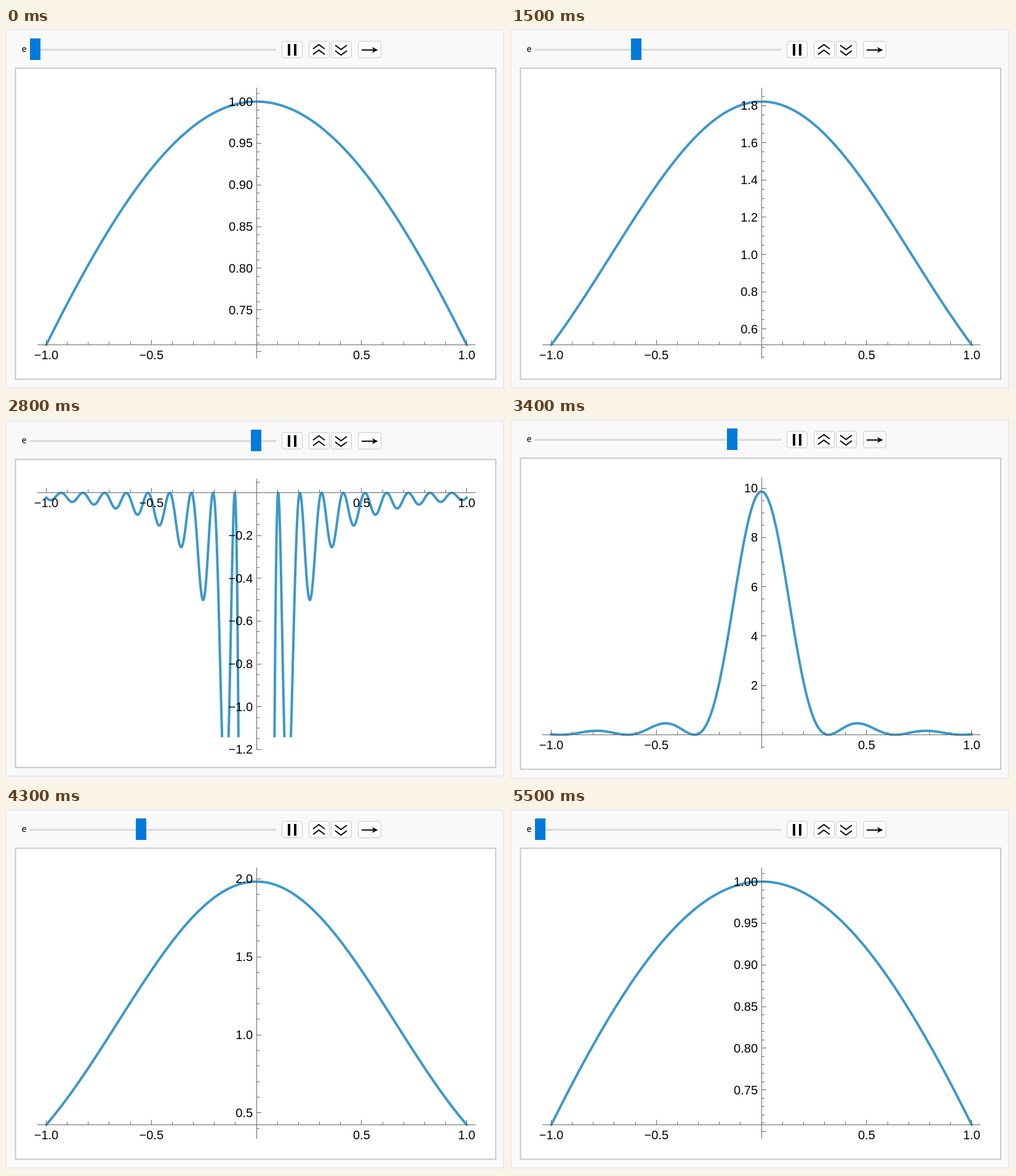
These frames come from a looping animation (811 by 589 pixels, 6000 ms). An HTML page with a canvas:

```html
<!DOCTYPE html>
<html lang="en">
<head>
<meta charset="utf-8">
<title>Interactive plot</title>
<style>
  html, body { margin: 0; width: 100%; height: 100%; overflow: hidden; background: #f3f3f3; }
  canvas { display: block; }
</style>
</head>
<body>
<canvas id="stage" width="811" height="589"></canvas>
<script>
const ctx = document.getElementById('stage').getContext('2d');
const LEFT = 51, RIGHT = 763, TOP = 97, BOTTOM = 538;
const DATA_TOP = 119.7, DATA_BOTTOM = 515.4;
const SAMPLES = 2400;
const toX = x => 407.1 + 341.6 * x;
const crisp = v => Math.floor(v) + 0.5;

// Parameter e: runs up in equal steps, turns, runs back, rests at zero.
function parameterAt(time) {
  const step = time < 500 ? 0 : Math.floor((time - 400) / 100);
  if (step === 0 || step > 50) return 0;
  return 0.0035 + 0.044755 * Math.min(step - 1, 50 - step);
}

function polyline(points, color, width) {
  ctx.beginPath();
  points.forEach(([x, y]) => ctx.lineTo(x, y));
  ctx.strokeStyle = color;
  ctx.lineWidth = width;
  ctx.stroke();
}

function rect(x, y, w, h, color) {
  ctx.fillStyle = color;
  ctx.fillRect(x, y, w, h);
}

function button(x, w) {
  ctx.beginPath();
  ctx.roundRect(x + 0.5, 21.5, w - 1, 27, 3.5);
  ctx.fillStyle = '#fdfdfd';
  ctx.fill();
  ctx.strokeStyle = '#c9c9c9';
  ctx.lineWidth = 1;
  ctx.stroke();
}

function chevrons(x, y, rise) {
  for (const dy of [0, 9])
    polyline([[x - 9.5, y + dy], [x, y + dy - rise], [x + 9.5, y + dy]], '#000', 2);
}

function drawControls(e) {
  ctx.font = '14px "Noto Sans", "Open Sans", sans-serif';
  ctx.textAlign = 'left';
  ctx.fillStyle = '#000';
  ctx.fillText('e', 25.5, 39);
  rect(39, 34, 400, 3, '#cfcfcf');
  rect(40, 35, 398, 1, '#ececec');
  rect(Math.floor(39 + 347.6 * e), 17, 17, 35, '#007adb');

  button(448, 34);
  rect(458, 26, 4, 19, '#000');
  rect(468, 26, 4, 19, '#000');
  button(492, 34);
  chevrons(508.5, 34, 7);
  button(528, 34);
  chevrons(544.5, 28, -7);
  button(572, 38);
  polyline([[578, 35.8], [600, 35.8]], '#000', 2);
  ctx.beginPath();
  [[604.5, 35.8], [595, 31], [597.5, 35.8], [595, 40.6]].forEach(p => ctx.lineTo(...p));
  ctx.fillStyle = '#000';
  ctx.fill();
}

function tickStep(span) {
  const base = 10 ** Math.floor(Math.log10(span / 8.2));
  const factor = [1, 2, 5, 10].find(m => span / (m * base) <= 8.2);
  return { major: factor * base, parts: factor === 2 ? 4 : 5 };
}

function label(value, digits, x, y) {
  ctx.fillText(value.toFixed(digits).replace('-', '\u2212'), x, y);
}

function drawPlot(e) {
  const a = 1 - e;
  const f = x => Math.abs(x) < 1e-9 ? 1 / a : a * Math.sin(x / a) ** 2 / (x * x);
  const curve = Array.from({ length: SAMPLES + 1 }, (_, i) => {
    const x = 2 * i / SAMPLES - 1;
    return [x, f(x)];
  });
  const values = curve.map(p => p[1]);
  const limit = Math.abs(a) < 1 / 15 ? 34.6 * Math.abs(a) : Infinity;
  const lo = Math.max(Math.min(...values), -limit);
  const hi = Math.min(Math.max(...values), limit);
  const scale = (DATA_BOTTOM - DATA_TOP) / (hi - lo);
  const toY = v => DATA_BOTTOM - (v - lo) * scale;

  ctx.save();
  ctx.beginPath();
  ctx.rect(LEFT, DATA_TOP - 2, RIGHT - LEFT, DATA_BOTTOM - DATA_TOP + 4);
  ctx.clip();
  ctx.lineCap = 'square';
  ctx.lineJoin = 'round';
  polyline(curve.map(([x, y]) => [toX(x), toY(y)]), '#3b98cc', 4);
  ctx.restore();

  const axisX = 407.5, axisY = crisp(toY(a > 0 ? lo : hi));
  const line = (x1, y1, x2, y2) => polyline([[x1, y1], [x2, y2]], '#666', 1);
  line(LEFT, axisY, RIGHT, axisY);
  line(axisX, TOP, axisX, BOTTOM);

  ctx.font = '20px "Liberation Sans", Arial, sans-serif';
  ctx.fillStyle = '#000';
  ctx.textAlign = 'center';
  for (let i = -10; i <= 10; i++) {
    const x = toX(i / 10), major = i % 5 === 0;
    line(crisp(x), axisY, crisp(x), axisY - (major ? 8 : 5));
    if (major && i) label(i / 10, 1, x, axisY + 23.5);
  }

  const { major, parts } = tickStep((BOTTOM - TOP) / scale);
  const minor = major / parts;
  const digits = Math.max(0, -Math.floor(Math.log10(major) + 1e-9));
  const first = Math.ceil((lo - (BOTTOM - DATA_BOTTOM) / scale) / minor);
  const last = Math.floor((hi + (DATA_TOP - TOP) / scale) / minor);
  ctx.textAlign = 'right';
  for (let i = first; i <= last; i++) {
    const y = toY(i * minor), isMajor = i % parts === 0;
    line(axisX, crisp(y), axisX + (isMajor ? 7.5 : 4.5), crisp(y));
    if (isMajor && Math.abs(y - axisY) > 14) label(i * minor, digits, 401, y + 7);
  }
}

function draw(time) {
  const e = parameterAt(time);
  const flipped = e > 1;
  rect(0, 0, 811, 589, '#f3f3f3');
  ctx.save();
  // Negative curves have their labels inside, so the panel is shorter and recentred.
  if (flipped) ctx.translate(0, 2);
  const shrink = flipped ? 5 : 0;
  rect(0, 3, 809, 583 - shrink, '#e2e2e2');
  rect(1, 4, 807, 581 - shrink, '#f9f9f9');
  rect(14.5, 64.5, 782.5, 508 - shrink, '#c8c8c8');
  rect(16.5, 66.5, 778.5, 504 - shrink, '#fff');
  drawControls(e);
  drawPlot(e);
  ctx.restore();
}

function tick() {
  draw(performance.now() % 6000);
  requestAnimationFrame(tick);
}
tick();
</script>
</body>
</html>
```
